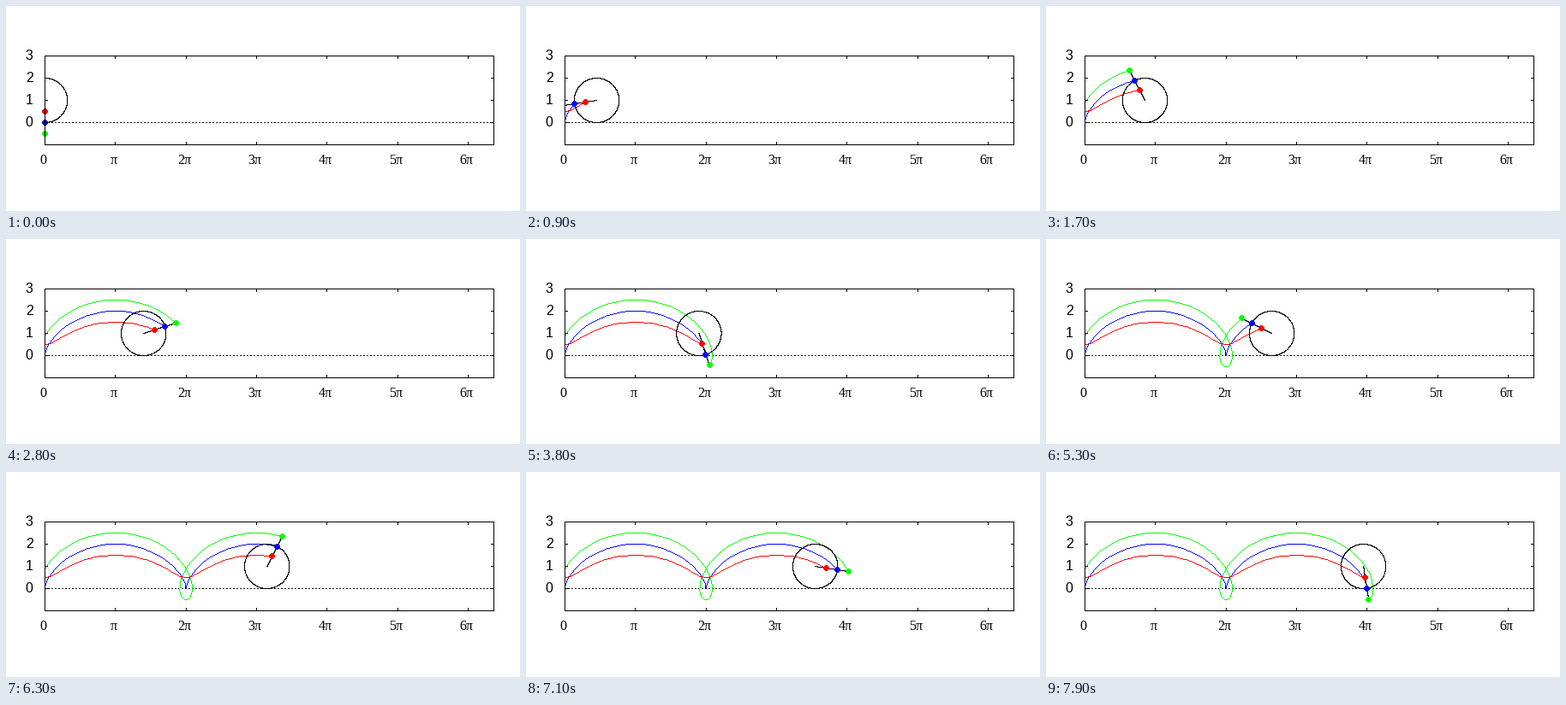
Recreate the animation shown at these times as a matplotlib script. Size 600x240 px, loop 8000 ms.

```python
import numpy as np
import matplotlib.pyplot as plt
from matplotlib.animation import FuncAnimation

W, H, DPI = 600, 240, 100
PX = 72 / DPI                       # one pixel in points
LEFT, RIGHT, TOP, BOTTOM = 45, 569, 58, 162
STEP = np.pi / 20                   # roll angle per frame
FRAMES = 80
TICK = 3
DOT = 3                             # dot radius
BLACK = (0, 0, 0)
ARMS = [(1.5, (0, 255, 0)), (1.0, (0, 0, 255)), (0.5, (255, 0, 0))]


def sx(x):
    return LEFT + np.asarray(x) * (RIGHT - LEFT) / 20


def sy(y):
    return BOTTOM - (np.asarray(y) + 1) * (BOTTOM - TOP) / 4


def pixel(v):
    return np.floor(np.asarray(v) + 0.5).astype(int)


def trochoid(t, r):
    return t - r * np.sin(t), 1 - r * np.cos(t)


def plot(canvas, px, py, color):
    """Colour the given pixels that lie inside the plot box."""
    px, py = pixel(px), pixel(py)
    inside = (px >= LEFT) & (px <= RIGHT) & (py >= TOP) & (py <= BOTTOM)
    canvas[py[inside], px[inside]] = color


def polyline(canvas, xs, ys, color):
    """Crisp one-pixel line through the points."""
    px, py = pixel(sx(xs)), pixel(sy(ys))
    for xa, ya, xb, yb in zip(px, py, px[1:], py[1:]):
        n = max(abs(xb - xa), abs(yb - ya)) + 1
        plot(canvas, np.linspace(xa, xb, n), np.linspace(ya, yb, n), color)


def dot(canvas, x, y, color):
    cx, cy = pixel(sx(x)), pixel(sy(y))
    dy, dx = np.mgrid[-DOT:DOT + 1, -DOT:DOT + 1]
    disc = dx ** 2 + dy ** 2 <= DOT ** 2 + 1
    canvas[cy + dy[disc], cx + dx[disc]] = color


def border(canvas):
    canvas[[TOP, BOTTOM], LEFT:RIGHT + 1] = BLACK
    canvas[TOP:BOTTOM + 1, [LEFT, RIGHT]] = BLACK
    for x in pixel(sx(np.arange(1, 7) * np.pi)):
        canvas[TOP:TOP + TICK + 1, x] = BLACK
        canvas[BOTTOM - TICK:BOTTOM + 1, x] = BLACK
    for y in pixel(sy(np.arange(3))):
        canvas[y, LEFT:LEFT + TICK + 1] = BLACK
        canvas[y, RIGHT - TICK:RIGHT + 1] = BLACK


fig = plt.figure(figsize=(W / DPI, H / DPI), dpi=DPI, facecolor="white")
ax = fig.add_axes([0, 0, 1, 1])
ax.axis("off")

blank = np.full((H, W, 3), 255, np.uint8)
zero = pixel(sy(0))
for shift in (0, 1):                # dotted zero line: two on, two off
    blank[zero, LEFT + shift:RIGHT:4] = BLACK
stage = ax.imshow(blank, extent=(0, W, H, 0), aspect="auto",
                  interpolation="nearest")

for k in range(7):
    label = "0" if k == 0 else ("" if k == 1 else str(k)) + "π"
    ax.text(sx(k * np.pi) - 1.5, 185, label, family="Liberation Serif",
            size=16 * PX, ha="center", va="baseline")
for k in range(4):
    ax.text(31.5, sy(k) + 5, str(k), family="Liberation Sans", size=16 * PX,
            ha="right", va="baseline")

rim = np.linspace(0, 2 * np.pi, 1000)
along = np.linspace(0, ARMS[0][0], 1000)


def draw(i):
    canvas = blank.copy()
    t = i * STEP
    past = np.arange(i + 1) * STEP
    for r, color in ARMS:
        polyline(canvas, *trochoid(past, r), color)

    # Wheel and spoke are sampled densely, which gives them a heavier line
    plot(canvas, sx(t + np.cos(rim)), sy(1 + np.sin(rim)), BLACK)
    spoke_x, spoke_y = trochoid(t, along)
    plot(canvas, sx(spoke_x), sy(spoke_y), BLACK)

    for r, color in ARMS:
        x, y = trochoid(t, r)
        if x >= 0:
            dot(canvas, x, y, color)
    border(canvas)
    stage.set_data(canvas)
    return [stage]


anim = FuncAnimation(fig, draw, frames=FRAMES, interval=100,
                     repeat=True, repeat_delay=0, blit=False)
plt.show()
```
